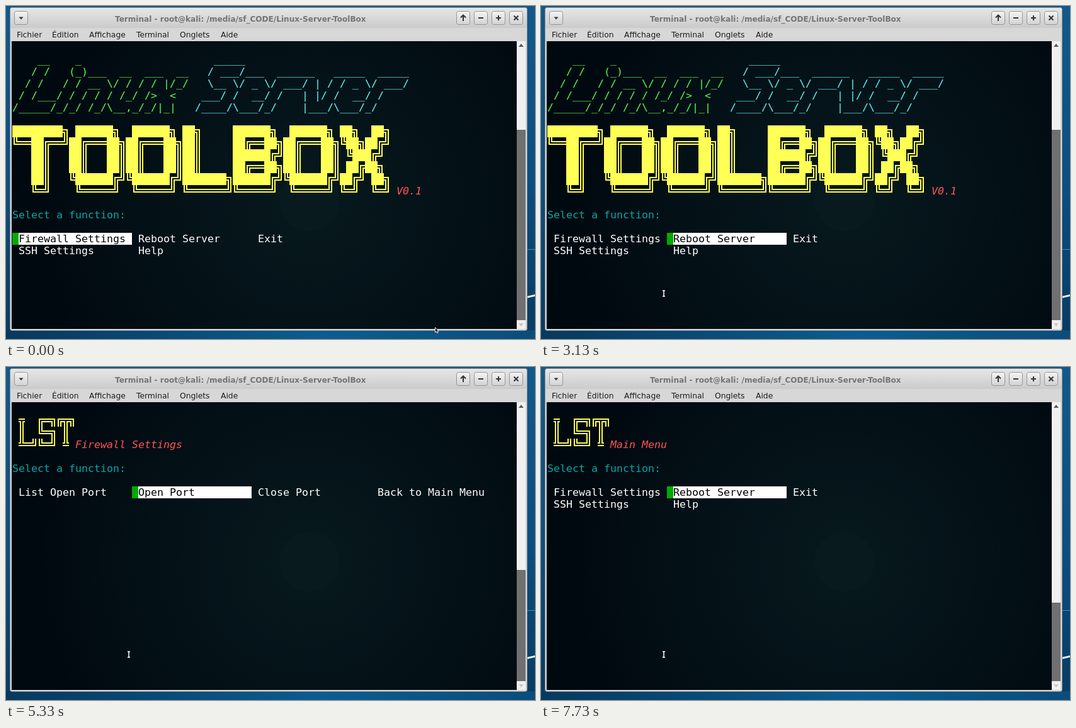
These frames come from a looping animation (840x530 px, 8000 ms). An HTML page:

```html
<!DOCTYPE html>
<html lang="fr">
<head>
<meta charset="utf-8">
<title>Terminal</title>
<style>
html, body { margin: 0; width: 100%; height: 100%; overflow: hidden; background: #0b4a78; }
svg { display: block; width: 840px; height: 530px; }
text { white-space: pre; }
.ui { font: 12.3px "DejaVu Sans", sans-serif; fill: #1c1c1c; }
.title { font: bold 12.07px "DejaVu Sans", sans-serif; fill: #747474; }
.term { font: 16.61px "DejaVu Sans Mono", monospace; fill: #fff; }
.term .note { font-style: italic; fill: #ff5555; }
.term .ask { fill: #00aaaa; }
.screen { display: none; }
.screen.on { display: inline; }
.item rect { display: none; }
.item.on rect { display: inline; }
.item.on text { fill: #000; }
.crisp, .item rect { shape-rendering: crispEdges; }
</style>
</head>
<body>
<svg id="stage" viewBox="0 0 840 530">
  <defs>
    <linearGradient id="sky" x1="0" y1="0" x2="0" y2="1">
      <stop offset="0" stop-color="#11598c"/>
      <stop offset=".55" stop-color="#0b4e80"/>
      <stop offset="1" stop-color="#073b63"/>
    </linearGradient>
    <linearGradient id="floor">
      <stop offset="0" stop-color="#06395f"/>
      <stop offset=".6" stop-color="#0c5c91"/>
      <stop offset="1" stop-color="#0a4d7d"/>
    </linearGradient>
    <linearGradient id="bar" x1="0" y1="0" x2="0" y2="1">
      <stop offset="0" stop-color="#e6e6e6"/>
      <stop offset="1" stop-color="#cbcbcb"/>
    </linearGradient>
    <linearGradient id="knob" x1="0" y1="0" x2="0" y2="1">
      <stop offset="0" stop-color="#f4f4f4"/>
      <stop offset="1" stop-color="#d2d2d2"/>
    </linearGradient>
    <radialGradient id="glow" gradientUnits="userSpaceOnUse" cx="482" cy="310" r="430">
      <stop offset="0" stop-color="#07191e"/>
      <stop offset=".5" stop-color="#041218"/>
      <stop offset="1" stop-color="#010910"/>
    </radialGradient>
  </defs>

  <rect width="840" height="530" fill="url(#sky)"/>
  <rect y="516" width="840" height="14" fill="url(#floor)"/>
  <path d="M828 387.5H840" stroke="#3f93c6"/>
  <path d="M827 462L840 459V462L827 465Z" fill="#e9f4fa"/>

  <rect x="6.5" y="2.5" width="821" height="514" rx="3" fill="#d6d6d6" stroke="#8d8d8d"/>
  <rect x="7" y="3" width="820" height="32" rx="3" fill="url(#bar)"/>
  <rect x="8" y="35" width="818" height="21" fill="#d7d7d7"/>
  <text class="title" x="173" y="24.5">Terminal - root@kali: /media/sf_CODE/Linux-Server-ToolBox</text>
  <g id="buttons" fill="none" stroke="#333" stroke-width="2"></g>
  <g id="menubar" class="ui"></g>

  <rect x="9" y="56" width="802" height="458" fill="url(#glow)"/>
  <circle cx="482" cy="310" r="48" fill="#0a1c20" opacity=".6"/>
  <rect x="811" y="56" width="14" height="458" fill="#f0f0f0"/>
  <path d="M814 65L818 60L822 65Z" fill="#5a5a5a"/>
  <path d="M814 505L818 510L822 505Z" fill="#c8c8c8"/>
  <rect id="thumb" class="crisp" x="811" width="14" fill="#707070"/>

  <g id="term" class="term"></g>
  <path id="arrow" d="M.5 .5V8.5L2.3 7L3.6 9.6L5 9L3.8 6.4H6Z" fill="#000" stroke="#fff" stroke-width=".9"/>
  <path id="beam" d="M-2 -4.5H2M0 -4.5V4.5M-2 4.5H2" stroke="#fff" stroke-width="1.5"/>
</svg>

<script>
const CW = 10, CH = 19, LEFT = 10, TOP = 57, YELLOW = '#ffff55', LOOP = 8000;
const $ = id => document.getElementById(id);

function add(parent, tag, attrs = {}, text) {
  const el = document.createElementNS('http://www.w3.org/2000/svg', tag);
  for (const key in attrs) el.setAttribute(key, attrs[key]);
  if (text !== undefined) el.textContent = text;
  parent.appendChild(el);
  return el;
}

const colX = col => LEFT + col * CW;
const rowY = row => TOP + row * CH;
const write = (parent, col, row, text, attrs = {}) =>
  add(parent, 'text', { x: colX(col), y: rowY(row) + 15, ...attrs }, text);

// Window furniture
const icons = [
  [24, 'M20.5 17.5H27.5L24 21.5Z'],
  [726, 'M726 24V15M722 18.5L726 14.5L730 18.5'],
  [754, 'M750 19H758'],
  [782, 'M778 19H786M782 15V23'],
  [810, 'M806.5 15.5L813.5 22.5M813.5 15.5L806.5 22.5']
];
icons.forEach(([x, d], i) => {
  add($('buttons'), 'rect', { x: x - 10.5, y: 8.5, width: 21, height: 21, rx: 3,
    fill: 'url(#knob)', stroke: '#959595', 'stroke-width': 1 });
  add($('buttons'), 'path', i ? { d } : { d, fill: '#333', stroke: 'none' });
});
[[17, 'Fichier'], [73, 'Édition'], [132, 'Affichage'], [207, 'Terminal'], [276, 'Onglets'], [341, 'Aide']]
  .forEach(([x, label]) => add($('menubar'), 'text', { x, y: 50 }, label));

// Centre lines of the double-line characters within one cell
const strokes = {
  '═': 'm0 9h10', '║': 'm5 0v19',
  '╔': 'm10 9h-5v10', '╗': 'm0 9h5v10', '╚': 'm10 9h-5v-9', '╝': 'm0 9h5v-9',
  '╦': 'm0 9h10m-5 0v10', '╩': 'm0 9h10m-5 0v-9'
};

function drawBoxes(parent, col, row, lines, id) {
  let blocks = '', rails = '';
  lines.forEach((line, r) => [...line].forEach((ch, c) => {
    const start = `M${colX(col + c)} ${rowY(row + r)}`;
    if (ch === '█') blocks += `${start}h10v19h-10z`;
    else if (strokes[ch]) rails += start + strokes[ch];
  }));
  const area = { x: 0, y: 0, width: 840, height: 530 };
  const mask = add(parent, 'mask', { id, maskUnits: 'userSpaceOnUse', ...area });
  [['#fff', 6], ['#000', 2]].forEach(([stroke, width]) => add(mask, 'path',
    { d: rails, fill: 'none', stroke, 'stroke-width': width, class: 'crisp' }));
  add(parent, 'rect', { ...area, fill: YELLOW, mask: `url(#${id})` });
  add(parent, 'path', { d: blocks, fill: YELLOW, class: 'crisp' });
}

const linux = String.raw`
    __    _
   / /   (_)___  __  ___  __
  / /   / / __ \/ / / / |/_/
 / /___/ / / / / /_/ />  <
/_____/_/_/ /_/\__,_/_/|_|`.split('\n');

const server = String.raw`
   _____
  / ___/___  ______   _____  _____
  \__ \/ _ \/ ___/ | / / _ \/ ___/
 ___/ /  __/ /   | |/ /  __/ /
/____/\___/_/    |___/\___/_/`.split('\n');

const toolbox = [
  '████████╗ ██████╗  ██████╗ ██╗     ██████╗  ██████╗ ██╗  ██╗',
  '╚══██╔══╝██╔═══██╗██╔═══██╗██║     ██╔══██╗██╔═══██╗╚██╗██╔╝',
  '   ██║   ██║   ██║██║   ██║██║     ██████╔╝██║   ██║ ╚███╔╝ ',
  '   ██║   ██║   ██║██║   ██║██║     ██╔══██╗██║   ██║ ██╔██╗ ',
  '   ██║   ╚██████╔╝╚██████╔╝███████╗██████╔╝╚██████╔╝██╔╝ ██╗',
  '   ╚═╝    ╚═════╝  ╚═════╝ ╚══════╝╚═════╝  ╚═════╝ ╚═╝  ╚═╝'
];
const initials = ['╦  ╔═╗╔╦╗', '║  ╚═╗ ║ ', '╩═╝╚═╝ ╩ '];

const mainMenu = [['Firewall Settings', 'SSH Settings'], ['Reboot Server', 'Help'], ['Exit']];
const portMenu = [['List Open Port'], ['Open Port'], ['Close Port'], ['Back to Main Menu']];

function makeScreen(thumbTop, menu, askRow, drawHead) {
  const group = add($('term'), 'g', { class: 'screen' });
  drawHead(group);
  write(group, 0, askRow, 'Select a function:', { class: 'ask' });
  const items = menu.flatMap((labels, c) => labels.map((label, r) => {
    const item = add(group, 'g', { class: 'item' });
    const col = c * 19, row = askRow + 2 + r;
    const box = { y: rowY(row), height: CH };
    add(item, 'rect', { ...box, x: colX(col), width: CW, fill: '#00aa00' });
    add(item, 'rect', { ...box, x: colX(col + 1), width: 18 * CW, fill: '#fff' });
    write(item, col + 1, row, label);
    return item;
  }));
  return { group, items, thumbTop };
}

const smallHead = (title, id) => group => {
  drawBoxes(group, 1, 1, initials, id);
  write(group, 10, 3, title, { class: 'note' });
};

const home = makeScreen(197, mainMenu, 14, group => {
  linux.forEach((line, r) => write(group, 0, r, line, { fill: '#55ff55', style: 'fill:#55ff55' }));
  server.forEach((line, r) => write(group, 29, r, line, { style: 'fill:#55ffff' }));
  drawBoxes(group, 0, 7, toolbox, 'big');
  write(group, 61, 12, 'V0.1', { class: 'note' });
});
const ports = makeScreen(323, portMenu, 5, smallHead('Firewall Settings', 'portHead'));
const back = makeScreen(375, mainMenu, 5, smallHead('Main Menu', 'backHead'));
const screens = [home, ports, back];

// [start ms, screen, selected item]
const steps = [
  [0, home, 0], [2400, home, 2], [2800, home, 4], [3130, home, 2], [3600, home, 3],
  [3930, home, 1], [4470, home, 0], [4930, ports, 0], [5330, ports, 1], [5670, ports, 2],
  [6070, ports, 3], [6330, back, 0], [6870, back, 1], [7400, back, 3], [7730, back, 2]
];

// [start ms, x, y] of the pointer
const moves = [
  [0, 681, 511], [270, 560, 496], [357, 420, 466], [443, 300, 441], [530, 242, 428],
  [670, 230, 432.5], [930, 218, 440], [997, 205, 447], [1063, 196, 452], [1130, 190, 455.5],
  [1270, 193, 456], [1335, 199, 457], [1400, 195, 457.5]
];

const current = (list, t) => list.findLast(entry => entry[0] <= t);

function draw(now) {
  const t = now % LOOP;
  const [, screen, selected] = current(steps, t);
  screens.forEach(s => s.group.classList.toggle('on', s === screen));
  screen.items.forEach((item, i) => item.classList.toggle('on', i === selected));
  $('thumb').setAttribute('y', screen.thumbTop);
  $('thumb').setAttribute('height', 500 - screen.thumbTop);

  const move = current(moves, t), onEdge = move === moves[0];
  const shown = $(onEdge ? 'arrow' : 'beam'), hidden = $(onEdge ? 'beam' : 'arrow');
  shown.style.display = 'inline';
  hidden.style.display = 'none';
  shown.setAttribute('transform', `translate(${move[1]} ${move[2]})`);
}

const begin = performance.now();
function tick() {
  draw(performance.now() - begin);
  requestAnimationFrame(tick);
}
tick();
</script>
</body>
</html>
```
